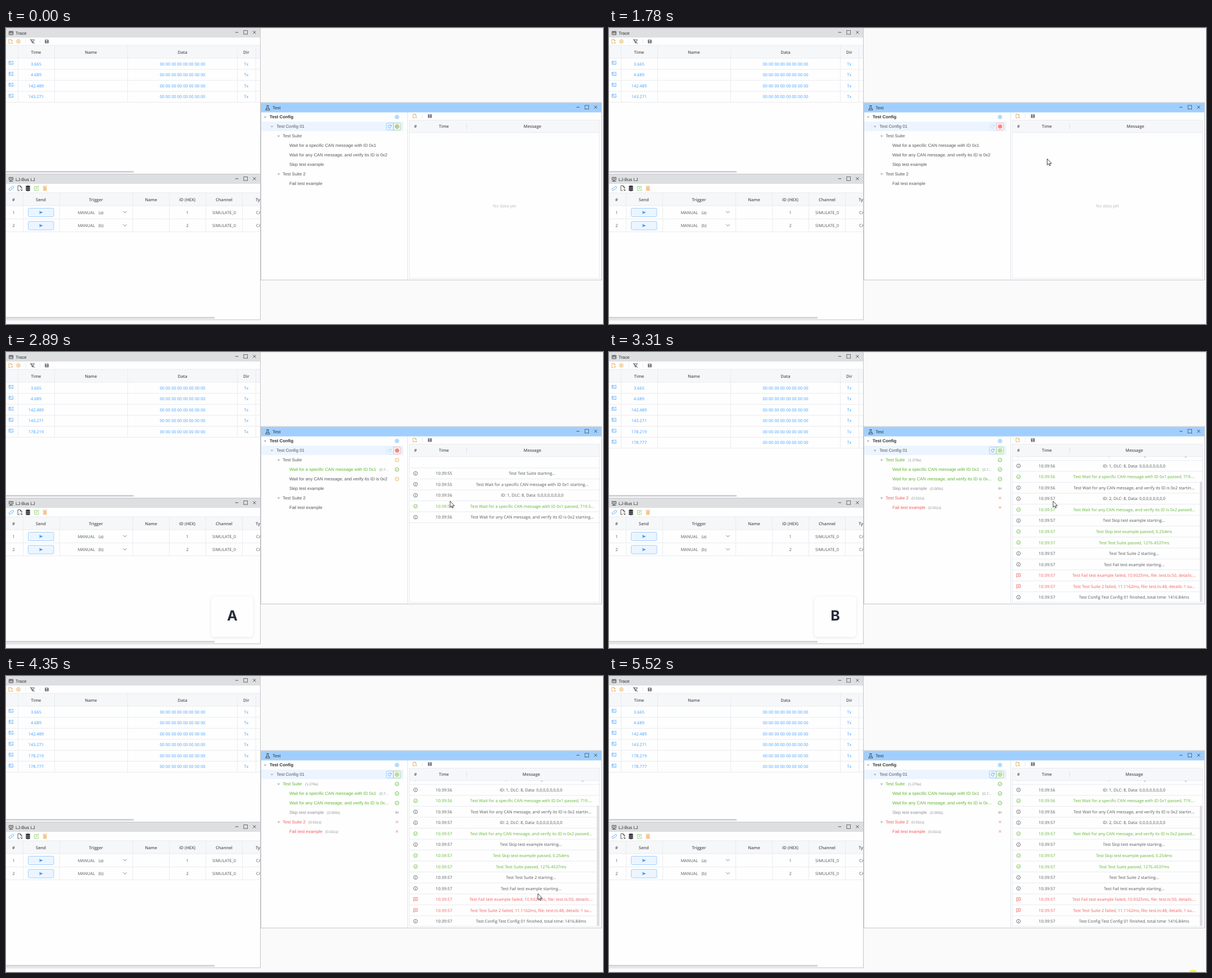
Write an HTML page with a canvas that moves like this. It is 1062 by 528 pixels and loops after 5.65 s.

```html
<!DOCTYPE html>
<html>
<head>
<meta charset="utf-8">
<style>
  html, body { margin: 0; width: 100%; height: 100%; overflow: hidden; background: #fafafa; }
  canvas { display: block; }
</style>
</head>
<body>
<canvas id="stage" width="1062" height="528"></canvas>
<script>
const ctx = document.getElementById('stage').getContext('2d');
const LOOP = 5650, FIRST = 130, STEP = 69.1;

const ARIAL = '7.8px "Liberation Sans", Arial, sans-serif';
const BOLD = 'bold ' + ARIAL;
const SMALL = '6.4px "Liberation Sans", Arial, sans-serif';
const SANS = '7.4px "Open Sans", sans-serif';
const HEAD = '600 7.5px "Open Sans", sans-serif';
const KEY = 'bold 25px Inter, sans-serif';

const INK = '#54565a', GREY = '#8f9196', BLUE = '#409eff', GREEN = '#5eb630',
      RED = '#f45c5c', ORANGE = '#e6a23c', LINE = '#e9ebf0', DARK = '#303133';

// Run progress: idle, first test, second test, finished
const CLICK = 1500, STAGES = [1920, 2620, 3180], LOG_COUNT = [0, 3, 6, 16];

const LOG = [
  [''],
  ['Test Test Suite starting...'],
  ['Test Wait for a specific CAN message with ID 0x1 starting...'],
  ['ID: 1, DLC: 8, Data: 0,0,0,0,0,0,0,0'],
  ['Test Wait for a specific CAN message with ID 0x1 passed, 719.5...', 'g',
   'Test Wait for a specific CAN message with ID 0x1 passed, 719....'],
  ['Test Wait for any CAN message, and verify its ID is 0x2 starting...', '',
   'Test Wait for any CAN message, and verify its ID is 0x2 startin...'],
  ['ID: 2, DLC: 8, Data: 0,0,0,0,0,0,0,0'],
  ['Test Wait for any CAN message, and verify its ID is 0x2 passed...', 'g'],
  ['Test Skip test example starting...'],
  ['Test Skip test example passed, 0.254ms', 'g'],
  ['Test Test Suite passed, 1276.4537ms', 'g'],
  ['Test Test Suite 2 starting...'],
  ['Test Fail test example starting...'],
  ['Test Fail test example failed, 10.9325ms, file: test.ts:50, details:...', 'r'],
  ['Test Test Suite 2 failed, 11.1162ms, file: test.ts:48, details: 1 su...', 'r'],
  ['Test Config Test Config 01 finished, total time: 1416.84ms'],
];

// Label, indent, status per stage (o running, g passed, s skipped, r failed), duration, duration x
const TREE = [
  ['Test Suite', 492, ' oog', '(1.276s)', 532],
  ['Wait for a specific CAN message with ID 0x1', 504, ' ogg', '(0.7...', 664],
  ['Wait for any CAN message, and verify its ID is 0x2', 504, '  og'],
  ['Skip test example', 504, '   s', '(0.000s)', 571],
  ['Test Suite 2', 492, '   r', '(0.011s)', 538],
  ['Fail test example', 504, '   r', '(0.011s)', 568],
];
const STATUS_COLOR = { g: GREEN, r: RED, o: ORANGE, s: GREY };

// Pointer tip: time, x, y
const PATH = [
  [130, 996, 524], [680, 665, 166], [750, 665, 166], [1030, 697, 176], [1500, 697, 176],
  [1710, 766, 213], [1780, 779, 232], [1990, 790, 266], [3400, 790, 266], [3930, 876, 316],
  [4350, 947, 389], [4560, 954, 411], [5180, 1034, 517], [5390, 1038, 529],
];

const ring = 'M3.3 0A3.3 3.3 0 1 1-3.3 0A3.3 3.3 0 1 1 3.3 0';
const ICON = {
  newDoc: 'M0 3.5H-3V-3.5H1L3-1.3V0M1-3.5V-1.3H3M1 2.5H4M2.5 1V4',
  docOut: 'M0 4H-3.5V-4.5H1L3.5-2V1M1-4.5V-2H3.5M1 1L4 4M4 2V4H2',
  plus: ring + 'M-1.8 0H1.8M0-1.8V1.8',
  filterOff: 'M-3-3H3.5L1 0V3L-1 2V0ZM-4-4L4 4',
  mail: 'M3.5-.5V2.7H-3.5V-2.7H1M-3.5-2L0 .6L1.5-.5M2-2.5H4M3-3.5V-1.5',
  link: 'M0-2L1.5-3.5A2 2 0 0 1 4-1L2 1A2 2 0 0 1-.5 1M0 2L-1.5 3.5A2 2 0 0 1-4 1L-2-1A2 2 0 0 1 .5-1',
  edit: 'M1-3.5H-3.5V3.5H3.5V0M-1 1L-.5-1L3.5-4L4-3L0 .7Z',
  card: 'M-3.5-3H3.5V3H-3.5ZM-3.5-1H3.5M-2 1H0M1 1H2.5M-2-2H2',
  monitor: 'M-3.5-3.5H3.5V1H-3.5ZM0 1V3M-3.5 3.5H3.5M-2-1.5H2M-2 3H-1',
  flask: 'M-2-4H2M-1.2-4V-1L-3.8 3.8H3.8L1.2-1V-4M-2.4 1.2H2.4',
  min: 'M-2.7 0H2.7',
  max: 'M-3.3-1.5V-3.3H-1.5M1.5-3.3H3.3V-1.5M3.3 1.5V3.3H1.5M-1.5 3.3H-3.3V1.5M-1-3.3H1M-1 3.3H1M-3.3-1V1M3.3-1V1',
  close: 'M-2.6-2.6L2.6 2.6M2.6-2.6L-2.6 2.6',
  chevron: 'M-3-1.5L0 1.5L3-1.5',
  refresh: 'M2.7-.9A2.8 2.8 0 1 0 2.5 1.3M2.9-2.8V-.8H.9',
  play: ring + 'M-.8-1.3L1.3 0L-.8 1.3Z',
  stop: ring + 'M-1-1H1V1H-1Z',
  info: ring + 'M0-.5V1.8M0-1.8V-1.1',
  g: ring + 'M-1.5 0L-.4 1.2L1.6-1',
  o: ring + 'M-1.6 0H-.9M-.3 0H.3M.9 0H1.6',
  s: 'M-2-1.8L.8 0L-2 1.8ZM1.9-2V2',
  r: 'M-2-2L2 2M2-2L-2 2',
  bug: 'M-3.3-3H3.3V2H-1L-3.3 3.5ZM-1.2-1.5L1.2 .9M1.2-1.5L-1.2 .9',
};
const ARROW = 'M0 0V11L2.5 8.7L4.2 12.3L5.8 11.6L4.2 8.2H7.7Z';
const HAND = 'M-1.2 1Q0-.9 1.2 1V5.2L5.4 6.2Q7 6.8 6.8 8.5L6 12V15H-.5L-3.8 9.6Q-4-7.6-2.6 8L-1.2 9.5Z'
  .replace('Q-4-7.6', 'Q-4 7.6');

function rect(x, y, w, h, fill) {
  ctx.fillStyle = fill;
  ctx.fillRect(x, y, w, h);
}

function box(x, y, w, h, r, fill, stroke) {
  ctx.beginPath();
  ctx.roundRect(x, y, w, h, r);
  ctx.fillStyle = fill;
  ctx.fill();
  if (stroke) { ctx.strokeStyle = stroke; ctx.lineWidth = 1; ctx.stroke(); }
}

function text(str, x, y, color = INK, font = SANS, align = 'center') {
  ctx.font = font;
  ctx.fillStyle = color;
  ctx.textAlign = align;
  ctx.fillText(str, x, y + 2.7);
}

function shape(d, x, y, stroke, fill, width = 0.8) {
  const path = new Path2D(d);
  ctx.save();
  ctx.translate(x, y);
  if (fill) { ctx.fillStyle = fill; ctx.fill(path); }
  if (stroke) { ctx.strokeStyle = stroke; ctx.lineWidth = width; ctx.stroke(path); }
  ctx.restore();
}
const icon = (name, x, y, color, fill) => shape(ICON[name], x, y, color, fill);

function saveIcon(x, y) {
  shape('M-3.3-3.3H2.3L3.3-2.3V3.3H-3.3Z', x, y, null, '#6d6875');
  rect(x - 1.8, y - 2.3, 3.2, 1.4, '#fff');
  rect(x - 1, y + 0.6, 2, 1.6, '#fff');
}

function windowFrame(x, y, w, h, title, iconName, bar) {
  rect(x, y, w, h, '#fefefe');
  rect(x, y, w, 17, bar);
  icon(iconName, x + (x ? 11.5 : 9), y + 9, DARK);
  text(title, x + (x ? 20 : 17), y + 8.9, DARK, ARIAL, 'left');
  const right = x + w;
  ['min', 'max', 'close'].forEach((name, i) => icon(name, right - 41.5 + i * 15.7, y + 7.8, DARK));
  ctx.strokeStyle = '#c4c6ca';
  ctx.lineWidth = 1;
  ctx.strokeRect(x - 0.5, y - 0.5, w + 1, h + 1);
}

function tableGrid(top, bottom, columns, rowLines) {
  rect(0, top, 452, 23, '#f6f7f9');
  columns.forEach(x => rect(x, top, 1, bottom - top, LINE));
  [top, top + 23, ...rowLines].forEach(y => rect(0, y - 0.5, 452, 1, LINE));
}

function drawTrace(stage) {
  const count = 4 + Math.max(0, stage - 1);
  const rows = ['3.665', '4.689', '142.489', '143.271', '178.219', '178.777'].slice(0, count);
  windowFrame(0, 0, 452, 260, 'Trace', 'card', '#dedfe1');
  icon('newDoc', 8, 24, ORANGE);
  icon('plus', 22, 24, ORANGE);
  icon('filterOff', 47, 24, DARK);
  saveIcon(72.5, 24);
  rect(34.5, 20, 1, 8, LINE);
  rect(60, 20, 1, 8, LINE);
  const rowY = i => 64 + i * 19.55;
  tableGrid(31, rowY(count) - 9.5, [21, 86, 216, 411, 444], rows.map((_, i) => rowY(i) + 9.8));
  [['Time', 53.5], ['Name', 151], ['Data', 314], ['Dir', 427.5]]
    .forEach(([label, x]) => text(label, x, 43, INK, HEAD));
  rows.forEach((time, i) => {
    const y = rowY(i);
    icon('mail', 9, y - 1.8, BLUE);
    text(time, 53.5, y, BLUE);
    text('00 00 00 00 00 00 00 00', 314, y, BLUE);
    text('Tx', 427.5, y, BLUE);
  });
  rect(0, 255, 227, 3, '#d0d1d4');
}

function drawSender() {
  windowFrame(0, 261, 452, 259, 'LJ-Bus LJ', 'monitor', '#dedfe1');
  icon('link', 9.5, 286, BLUE);
  icon('docOut', 24.5, 286, DARK);
  for (const dy of [3, 0, -3]) shape('M-4 0A4 1.7 0 1 1 4 0V1A4 1.7 0 0 1-4 1Z', 39, 285.5 + dy, '#fff', DARK, 0.5);
  icon('edit', 54, 286, '#86cf63');
  box(66, 283, 6.5, 7.5, 1, '#f6c78f');
  rect(65, 281.5, 8.5, 1, '#f6c78f');
  tableGrid(294, 363.5, [30, 95, 225, 290, 355, 420], [340.5, 363.5]);
  ctx.save();
  ctx.beginPath();
  ctx.rect(0, 294, 452, 70);
  ctx.clip();
  [['#', 13.5], ['Send', 62], ['Trigger', 160], ['Name', 258], ['ID (HEX)', 322.5], ['Channel', 388], ['Type', 452.5]]
    .forEach(([label, x]) => text(label, x, 306, INK, HEAD));
  ['a', 'b'].forEach((key, i) => {
    const y = 329 + i * 23.5;
    text(i + 1, 13.5, y);
    box(39.5, y - 7.5, 45.5, 15, 2, '#ecf5ff', '#a0cfff');
    shape('M-3-2.8L4 0L-3 2.8L-2 0Z', 62, y, null, BLUE);
    text('MANUAL', 143, y);
    text(`(${key})`, 169, y);
    icon('chevron', 211.5, y - 0.7, INK);
    text(i + 1, 322.5, y);
    text('SIMULATE_0', 388, y);
    text('CAN', 445, y, INK, SANS, 'left');
  });
  ctx.restore();
  rect(0, 515.5, 371, 3, '#d0d1d4');
}

function caret(x, y) {
  shape('M-2.4-1.2H2.4L0 1.5Z', x, y, null, '#a8abb2');
}

function drawTree(stage, running, hover) {
  if (hover) rect(454, 150.5, 253, 16.5, '#f5f7fa');
  rect(454, 167, 253, 17, '#ecf5ff');
  caret(461, 159);
  text('Test Config', 469, 158.7, DARK, BOLD, 'left');
  icon('plus', 695.5, 158.7, '#79bbff', '#d9ecff');
  caret(473, 176);
  text('Test Config 01', 481, 175.7, INK, ARIAL, 'left');

  box(676.5, 169.5, 12.5, 12.5, [2, 0, 0, 2], '#ecf5ff', running ? '#d9ecff' : '#a0cfff');
  icon('refresh', 682.5, 175.7, running ? '#a0cfff' : BLUE);
  const done = stage === 3;
  box(689.5, 169.5, 12.5, 12.5, [0, 2, 2, 0], running ? '#fef0f0' : '#f0f9eb', running ? '#fab6b6' : '#b3d89d');
  if (running) icon('stop', 695.7, 175.7, RED, '#f9a0a0');
  else icon('play', 695.7, 175.7, done ? GREEN : '#5b7f3c');

  TREE.forEach(([label, x, states, duration, durationX], i) => {
    const y = 192.6 + i * 16.95, state = states[stage];
    const color = 'grs'.includes(state) ? STATUS_COLOR[state] : INK;
    if (x === 492) caret(485, y + 0.3);
    if (state === 'g' && i === 2) label = label.replace('0x2', '0x...');
    text(label, x, y, color, ARIAL, 'left');
    if (state === ' ') return;
    if (duration && state !== 'o') text(duration, durationX, y, GREY, SMALL, 'left');
    icon(state, 695.5, y, STATUS_COLOR[state]);
  });
}

function drawLog(stage, empty) {
  const scrolled = stage === 3, scroll = scrolled ? 52.5 : 0, center = scrolled ? 934 : 936;
  icon('newDoc', 727, 157, ORANGE);
  rect(740, 153, 1, 8, LINE);
  saveIcon(754, 157);
  ctx.save();
  ctx.beginPath();
  ctx.rect(717, 186, 339, 261);
  ctx.clip();
  LOG.slice(0, LOG_COUNT[stage]).forEach(([message, state, narrow], i) => {
    const y = 197 + i * 19.53 - scroll, color = STATUS_COLOR[state] || INK;
    rect(717, y + 9.3, 338, 1, LINE);
    if (!message) return;
    icon(state === 'r' ? 'bug' : state || 'info', 728.5, y, color);
    text(`10:39:${i < 3 ? 55 : i < 6 ? 56 : 57}`, 779, y, color);
    text(scrolled && narrow || message, center, y, color);
  });
  if (scrolled) box(1051, 231, 4, 215, 2, '#dcdde0');
  ctx.restore();
  rect(717, 164, 339, 22.5, '#f6f7f9');
  ctx.strokeStyle = LINE;
  ctx.strokeRect(717.5, 164.5, 338, 282);
  rect(717, 186, 339, 1, LINE);
  rect(819, 170, 1, 11, '#e0e2e7');
  text('#', 728.5, 175.5, INK, HEAD);
  text('Time', 779, 175.5, INK, HEAD);
  text('Message', center + 0.5, 175.5, INK, HEAD);
  if (empty) text('No data yet', 886.5, 317, '#b9bbc0', '7.6px "Open Sans", sans-serif');
}

function drawKey(t) {
  const ramp = (from, to) => Math.min(1, Math.max(0, (t - from) / (to - from)));
  const alpha = ramp(2560, 2690) * (1 - ramp(3620, 3860));
  if (!alpha) return;
  ctx.save();
  ctx.globalAlpha = alpha;
  ctx.translate(0, (1 - alpha) * 6);
  ctx.shadowColor = 'rgba(0, 0, 0, 0.1)';
  ctx.shadowBlur = 5;
  ctx.shadowOffsetY = 1;
  box(365, 436, 75, 72.5, 6, '#fefefe');
  ctx.shadowColor = 'transparent';
  text(t < STAGES[2] ? 'A' : 'B', 402.5, 476.6, '#252b35', KEY);
  ctx.restore();
}

function pointerAt(t) {
  const next = PATH.findIndex(p => p[0] > t);
  if (next < 1) return null;
  const [t0, x0, y0] = PATH[next - 1], [t1, x1, y1] = PATH[next];
  const k = (t - t0) / (t1 - t0);
  return { x: x0 + (x1 - x0) * k, y: y0 + (y1 - y0) * k };
}

function draw(t) {
  const stage = STAGES.filter(start => t >= start).length;
  const pointer = pointerAt(t);
  const inTree = pointer && pointer.x > 454 && pointer.x < 707 && pointer.y > 150 && pointer.y < 287;
  rect(0, 0, 1062, 528, '#fafafa');
  rect(453, 0, 609, 1, '#e8e9eb');
  drawTrace(stage);
  drawSender();
  windowFrame(454, 133.5, 605, 315.5, 'Test', 'flask', '#a0cfff');
  rect(714, 150.5, 1, 298, '#e2e4e8');
  drawTree(stage, t >= CLICK && stage < 3, inTree && pointer.y < 167);
  drawLog(stage, t < 1850);
  drawKey(t);
  if (pointer) shape(inTree ? HAND : ARROW, pointer.x, pointer.y, '#111', '#fff');
  if (t > 5480) shape('M-7 0A7 5 0 0 1 7 0Z', 1039, 529, null, '#fbf04a');
}

ctx.textRendering = 'geometricPrecision';

function frame(now) {
  const t = now % LOOP;
  const step = Math.floor((t - FIRST + 12) / STEP);
  draw(t < FIRST ? 0 : FIRST + Math.min(step, 78) * STEP);
  requestAnimationFrame(frame);
}
requestAnimationFrame(frame);
</script>
</body>
</html>
```
